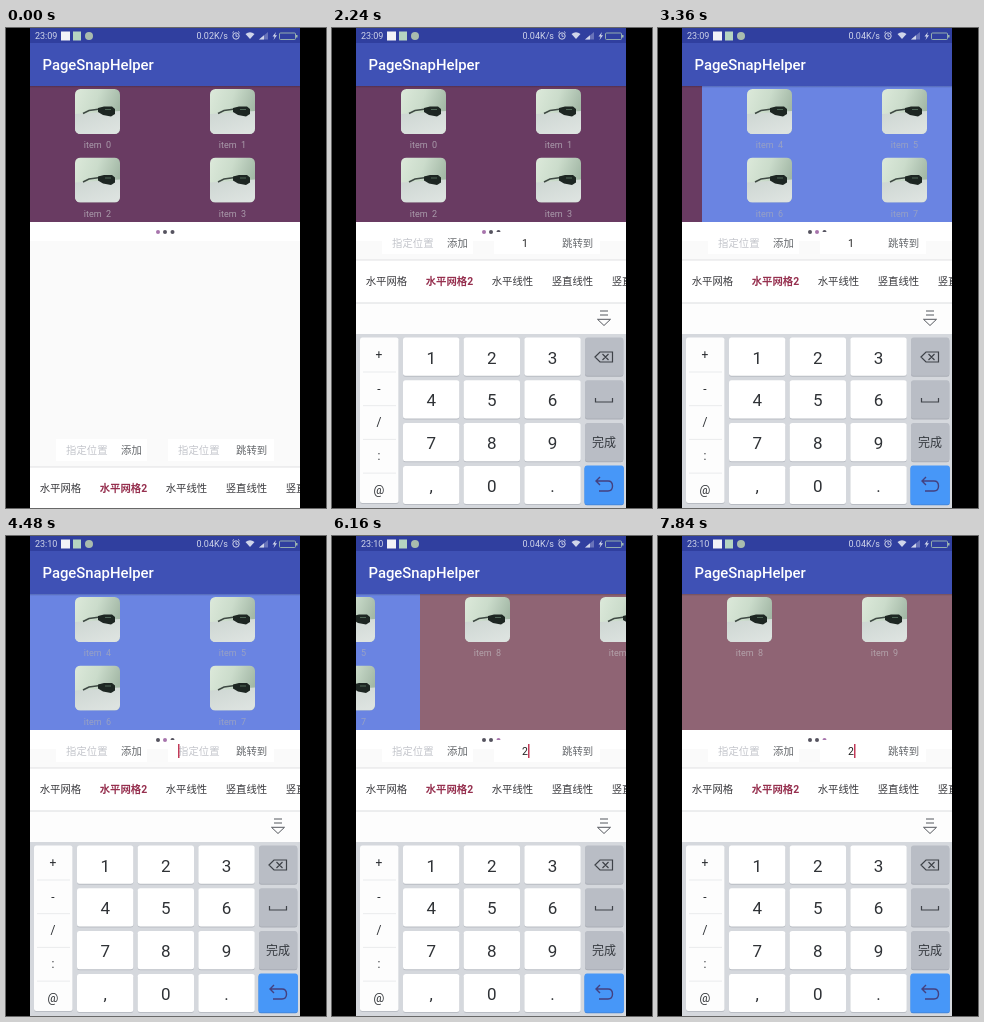
Recreate the animation shown at these times as an HTML page. Size 320 by 480 pixels, loop 8 s.

```html
<!DOCTYPE html>
<html lang="zh-CN">
<head>
<meta charset="utf-8">
<title>PageSnapHelper</title>
<style>
  html, body { margin: 0; width: 100%; height: 100%; overflow: hidden; background: #000; }
  svg { display: block; width: 100%; height: 100%; }
  text { font-family: Roboto, "Noto Sans CJK SC", "Noto Sans CJK", sans-serif; white-space: pre; }
  .cjk { font-size: 10.4px; }
  .mid { text-anchor: middle; }
</style>
</head>
<body>
<svg viewBox="0 0 320 480">
  <defs>
    <clipPath id="screen"><rect x="24" width="270" height="480"/></clipPath>
    <clipPath id="thumbClip"><rect width="45" height="45" rx="5.5"/></clipPath>
    <linearGradient id="wall" x2="1" y2=".35">
      <stop stop-color="#dce9da"/><stop offset=".5" stop-color="#cbdccb"/><stop offset="1" stop-color="#a3b8a6"/>
    </linearGradient>
    <linearGradient id="table" x2=".7" y2="1">
      <stop stop-color="#cdd6d2"/><stop offset="1" stop-color="#dde3e0"/>
    </linearGradient>
    <linearGradient id="shade" x2="0" y2="1">
      <stop stop-color="#000" stop-opacity=".2"/><stop offset="1" stop-color="#000" stop-opacity="0"/>
    </linearGradient>
    <g id="thumb" clip-path="url(#thumbClip)">
      <rect width="45" height="45" fill="url(#wall)"/>
      <path d="M0 25L45 22V45H0Z" fill="url(#table)"/>
      <path d="M8 24.5L14 21.5L25 20" fill="none" stroke="#3f4a44" stroke-width="1.6"/>
      <path d="M23 19L29 17.5H37L40 20V25L36 27.5L28 26L23 23Z" fill="#1d2622"/>
      <path d="M30 20.5H36" stroke="#4f6657"/>
    </g>
  </defs>
  <rect width="320" height="480" fill="#000"/>
  <g clip-path="url(#screen)">
    <rect x="24" width="270" height="480" fill="#fafafa"/>
    <rect x="24" y="194" width="270" height="19" fill="#fff"/>
    <g id="pages"></g>
    <rect x="24" y="58" width="270" height="2" fill="url(#shade)"/>
    <g id="dots"></g>
    <g id="bottom"></g>
    <g id="keyboard"></g>
    <rect x="24" width="270" height="15" fill="#303f9f"/>
    <rect x="24" y="15" width="270" height="43" fill="#3f51b5"/>
    <text x="36.5" y="42.3" font-size="14.85" font-weight="500" fill="#fff">PageSnapHelper</text>
    <g id="status" fill="#d0d5ea" font-size="9"></g>
  </g>
</svg>
<script>
const NS = 'http://www.w3.org/2000/svg';
const LOOP = 8000, STEP = 280, PAGE_W = 270, LIFT = 207;
const $ = id => document.getElementById(id);

function add(parent, tag, attrs, content) {
  const el = document.createElementNS(NS, tag);
  for (const k in attrs) el.setAttribute(k, attrs[k]);
  if (content !== undefined) el.textContent = content;
  parent.appendChild(el);
  return el;
}
const box = (p, x, y, width, height, fill, rx = 0) => add(p, 'rect', { x, y, width, height, fill, rx });
const label = (p, x, y, s, attrs) => add(p, 'text', { x, y, ...attrs }, s);
const line = (p, d, stroke, width = 1) =>
  add(p, 'path', { d, stroke, fill: 'none', 'stroke-width': width });
const show = (el, on) => el.setAttribute('visibility', on ? 'visible' : 'hidden');
const move = (el, x, y) => el.setAttribute('transform', `translate(${x} ${y})`);

// Grid pages
['#693b62', '#6a84e2', '#8f6474'].forEach((color, page) => {
  const g = add($('pages'), 'g', { transform: `translate(${24 + page * PAGE_W} 57)` });
  box(g, 0, 0, PAGE_W, 137, color);
  const count = page < 2 ? 4 : 2;
  const ink = ['#aa9bab', '#98a1c4', '#b3a2aa'][page];
  for (let i = 0; i < count; i++) {
    const x = 45 + 135 * (i % 2), y = 4 + 68.5 * (i >> 1);
    add(g, 'use', { href: '#thumb', transform: `translate(${x} ${y})` });
    label(g, x + 22.5, y + 59, `item  ${page * 4 + i}`, { class: 'mid', 'font-size': 9, fill: ink });
  }
});

const dots = [152, 159, 166.5].map(cx => add($('dots'), 'circle', { cx, cy: 204, r: 2 }));

// Input row and tabs
const bottom = $('bottom');
box(bottom, 50, 411, 91, 22, '#fff');
box(bottom, 162, 411, 106, 22, '#fff');
const hintStyle = { class: 'cjk', fill: '#c3c5cb' }, buttonStyle = { class: 'cjk', fill: '#65686c' };
label(bottom, 60, 425.5, '指定位置', hintStyle);
label(bottom, 115, 425.5, '添加', buttonStyle);
const hint = label(bottom, 172, 425.5, '指定位置', hintStyle);
label(bottom, 230, 425.5, '跳转到', buttonStyle);
const value = label(bottom, 193, 426, '', { class: 'mid', 'font-size': 10.5, fill: '#222' });
const caret = box(bottom, 172, 415, 1.5, 14, '#c23a58');
box(bottom, 24, 439, 270, 250, '#fff');
box(bottom, 24, 438.5, 270, 1, '#e2e2e4');
['水平网格', '水平网格2', '水平线性', '竖直线性', '竖直网格'].forEach((name, i) => {
  label(bottom, [33.7, 93.7, 159.7, 219.7, 279.7][i], 463.7, name, i === 1
    ? { class: 'cjk', fill: '#96304f', 'font-weight': 700 }
    : { class: 'cjk', fill: '#3a3a3e' });
});

// Keyboard
const kb = $('keyboard');
box(kb, 24, 275, 270, 31, '#fdfdfd');
box(kb, 24, 274.5, 270, 1, '#dcdde0');
line(kb, 'M268 283H276M268 287H276M265.5 291.3H278.5L272 297.5Z', '#55585e');
box(kb, 24, 306, 270, 174, '#d5d8dd');

function key(x, y, w, h, fill, edge = '#b9bdc4') {
  box(kb, x, y + 1, w, h, edge, 2.5);
  box(kb, x, y, w, h, fill, 2.5);
}
key(28, 309.5, 38.5, 165.5, '#fdfdfd');
['+', '-', '/', ':', '@'].forEach((s, i) => {
  const y = 327 + 33.7 * i;
  label(kb, 47, y + 4, s, { class: 'mid', 'font-size': 12, fill: '#2c2f33' });
  if (i < 4) box(kb, 31, y + 16.5, 33, 1, '#eaebed');
});
[...'123456789,0.'].forEach((s, i) => {
  const x = 71 + 60.7 * (i % 3), y = 309.5 + 42.8 * Math.floor(i / 3);
  key(x, y, 56.3, 38.2, '#fff');
  label(kb, x + 28.2, y + 26, s, { class: 'mid', 'font-size': 17, fill: '#2f3236' });
});
for (let i = 0; i < 3; i++) key(253, 309.5 + 42.8 * i, 38.3, 38.2, '#b9bdc5', '#a9adb5');
key(252.5, 437.5, 39.3, 38.8, '#4797f8', '#4386dc');
const dark = '#3e4248';
line(kb, 'M263 329L268 324H280.5V334H268ZM270.5 326L276.5 332M276.5 326L270.5 332', dark, 1.2);
line(kb, 'M263.5 370V374H280.5V370', dark, 1.2);
label(kb, 272, 419.3, '完成', { class: 'mid', 'font-size': 12, fill: '#34383e' });
line(kb, 'M268 449L264 453L268 457M264 453H276Q280.5 453 280.5 458Q280.5 463 276 463H267', '#44407f', 1.4);

// Status bar
const status = $('status');
const clock = label(status, 29, 11.2, '');
const speed = label(status, 222, 11.2, '', { 'text-anchor': 'end' });
box(status, 55, 3.5, 9, 9, '#f2f3f7');
box(status, 67, 3.5, 8, 9, '#b5d5c1');
add(status, 'circle', { cx: 83, cy: 8, r: 4, fill: '#a9bcae' });
const pale = '#d0d5ea';
add(status, 'circle', { cx: 230, cy: 8, r: 3.2, fill: 'none', stroke: pale });
line(status, 'M230 6V8.3H231.7M226.3 5L228 3.4M233.7 5L232 3.4', pale, .9);
add(status, 'path', { d: 'M239.5 6Q244 2.5 248.5 6L244 11Z' });
add(status, 'path', { d: 'M253 11.5L262 4V11.5Z', opacity: .35 });
add(status, 'path', { d: 'M253 11.5L258 7.3V11.5Z' });
add(status, 'path', { d: 'M270 4L266.5 8.5H268.6L267.5 12L271 7.3H269Z' });
add(status, 'rect', { x: 273.5, y: 5, width: 16, height: 6.5, rx: 1, fill: 'none', stroke: '#9fb9b0', 'stroke-width': .9 });
box(status, 290, 7, 1.5, 2.5, '#9fb9b0');

// Share of the way left in a decelerating move
function remaining(t, start, duration) {
  const p = Math.min(1, Math.max(0, (t - start) / duration));
  return (1 - p) ** 2;
}

const caretResets = [700, 1600, 4300, 5150, 7500];

function draw(time) {
  const t = Math.floor(time / STEP) * STEP;
  const open = t >= 700;

  const scroll = 2 - remaining(t, 2380, 1347) - remaining(t, 5285, 1710);
  move($('pages'), -Math.round(scroll * PAGE_W), 0);
  const page = Math.round(scroll + .2);
  dots.forEach((dot, i) => dot.setAttribute('fill', i === page ? '#a774ac' : '#55535f'));

  move(bottom, 0, open ? -LIFT : 0);
  show(kb, open);
  move(kb, 0, Math.round(205 * remaining(t, 660, 620)));

  const typed = t >= 5040 ? '2' : t >= 1600 && t < 4480 ? '1' : '';
  value.textContent = typed;
  show(hint, !typed);
  const reset = caretResets.filter(r => r <= t).pop();
  show(caret, open && Math.floor((t - reset) / 500) % 2 === 0);
  caret.setAttribute('x', typed ? 196 : 172);

  clock.textContent = t < 4480 ? '23:09' : '23:10';
  speed.textContent = t < 560 ? '0.02K/s' : '0.04K/s';
}

const begin = performance.now();
function tick() {
  draw((performance.now() - begin) % LOOP);
  requestAnimationFrame(tick);
}
tick();
</script>
</body>
</html>
```
